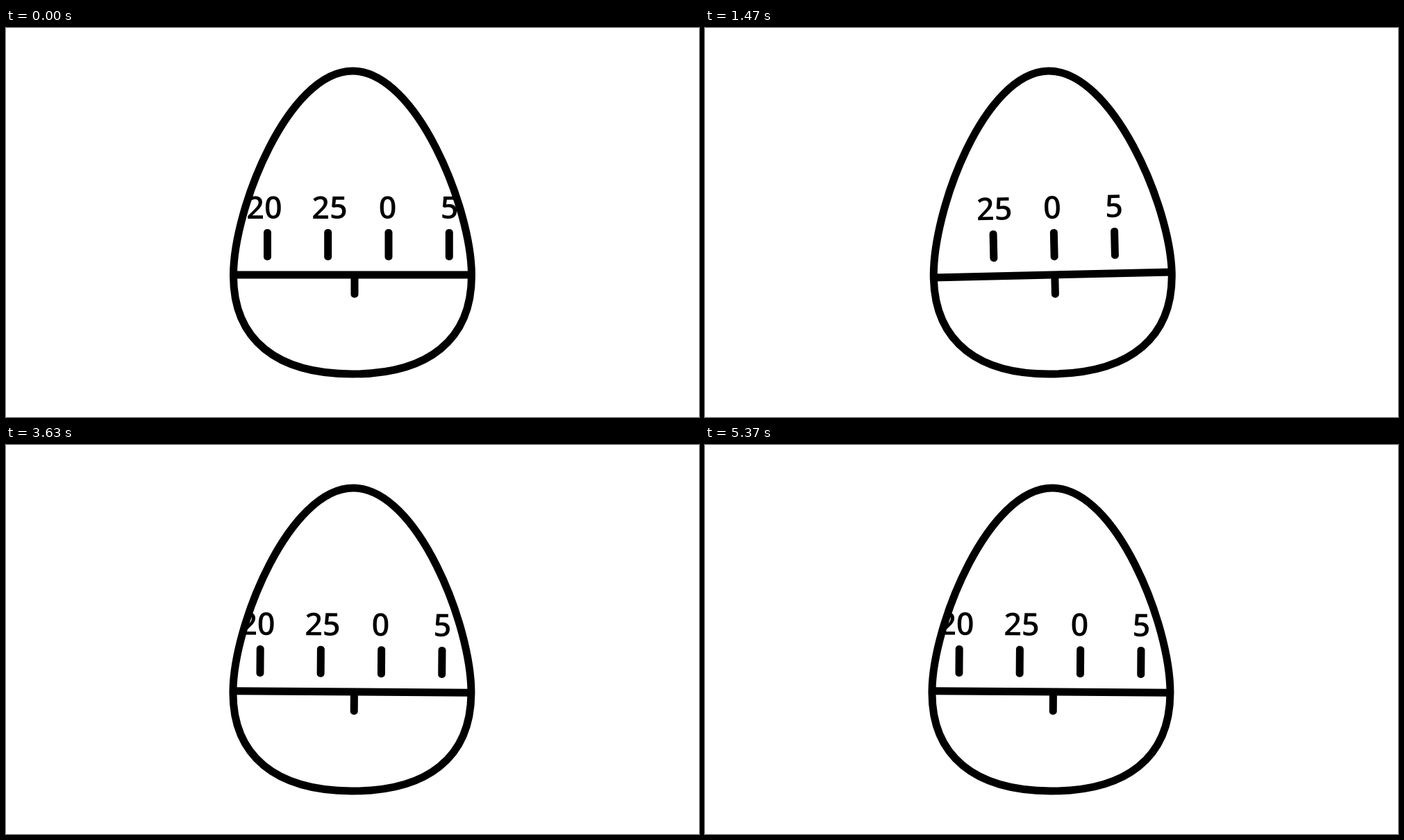
Animation, 998 px wide and 561 px high, one loop 5.41 s. Source, as an HTML page:

```html
<!DOCTYPE html>
<html lang="en">
<head>
<meta charset="utf-8">
<title>Egg timer</title>
<style>
  html, body { margin: 0; width: 100%; height: 100%; overflow: hidden; background: #fff; }
  svg { display: block; width: 100%; height: 100%; }
  text { font: 600 45px "Open Sans", "Noto Sans", sans-serif; text-anchor: middle; }
</style>
</head>
<body>
<svg viewBox="0 0 998 561">
  <defs>
    <path id="shell" d="M499 62C407 62 327.5 260 327.5 357C327.5 450 390 499 499 499
      C608 499 670.5 450 670.5 357C670.5 260 591 62 499 62Z"/>
    <clipPath id="inside"><use href="#shell"/></clipPath>
  </defs>
  <g id="egg">
    <g clip-path="url(#inside)"><g id="dial"></g></g>
    <use href="#shell" fill="none" stroke="#000" stroke-width="11"/>
    <path d="M327.5 356H670.5" stroke="#000" stroke-width="11"/>
    <rect x="496.5" y="353" width="11" height="36" rx="5"/>
  </g>
</svg>
<script>
const egg = document.getElementById('egg');
const dial = document.getElementById('dial');

const STEPS = 162, LOOP = 5410, HALF = 27; // 30 steps per second, played forth and back
const TURN_END = 7.5, SWING = 3, TILT = 2, TRAVEL = 49;

// label, label centre, mark centre
const marks = [[20, 372, 376.5], [25, 466, 463.7], [0, 549.5, 551], [5, 638.5, 638.3]];
dial.innerHTML = marks.map(([label, textX, x]) =>
  `<text x="${textX}" y="274.8">${label}</text>
   <rect x="${x - 5.5}" y="290" width="11" height="45" rx="5"/>`).join('');

function pose(s) {
  if (s < TURN_END) {
    const p = Math.sin(s / TURN_END * Math.PI / 2);
    return { shift: -TRAVEL * p, angle: TILT * p };
  }
  // the bell rings: linear swing between both extremes
  const phase = (s - TURN_END) / SWING % 2;
  return { shift: -TRAVEL, angle: TILT * (2 * Math.abs(1 - phase) - 1) };
}

function draw() {
  const time = performance.now() % LOOP;
  const step = Math.min(STEPS - 1, Math.floor((time + 5) * 0.03));
  const cycle = step % (2 * HALF);
  const { shift, angle } = pose(Math.min(cycle, 2 * HALF - cycle));
  egg.setAttribute('transform', `rotate(${angle} 499 280.5)`);
  dial.setAttribute('transform', `translate(${shift} 0)`);
  requestAnimationFrame(draw);
}
draw();
</script>
</body>
</html>
```
